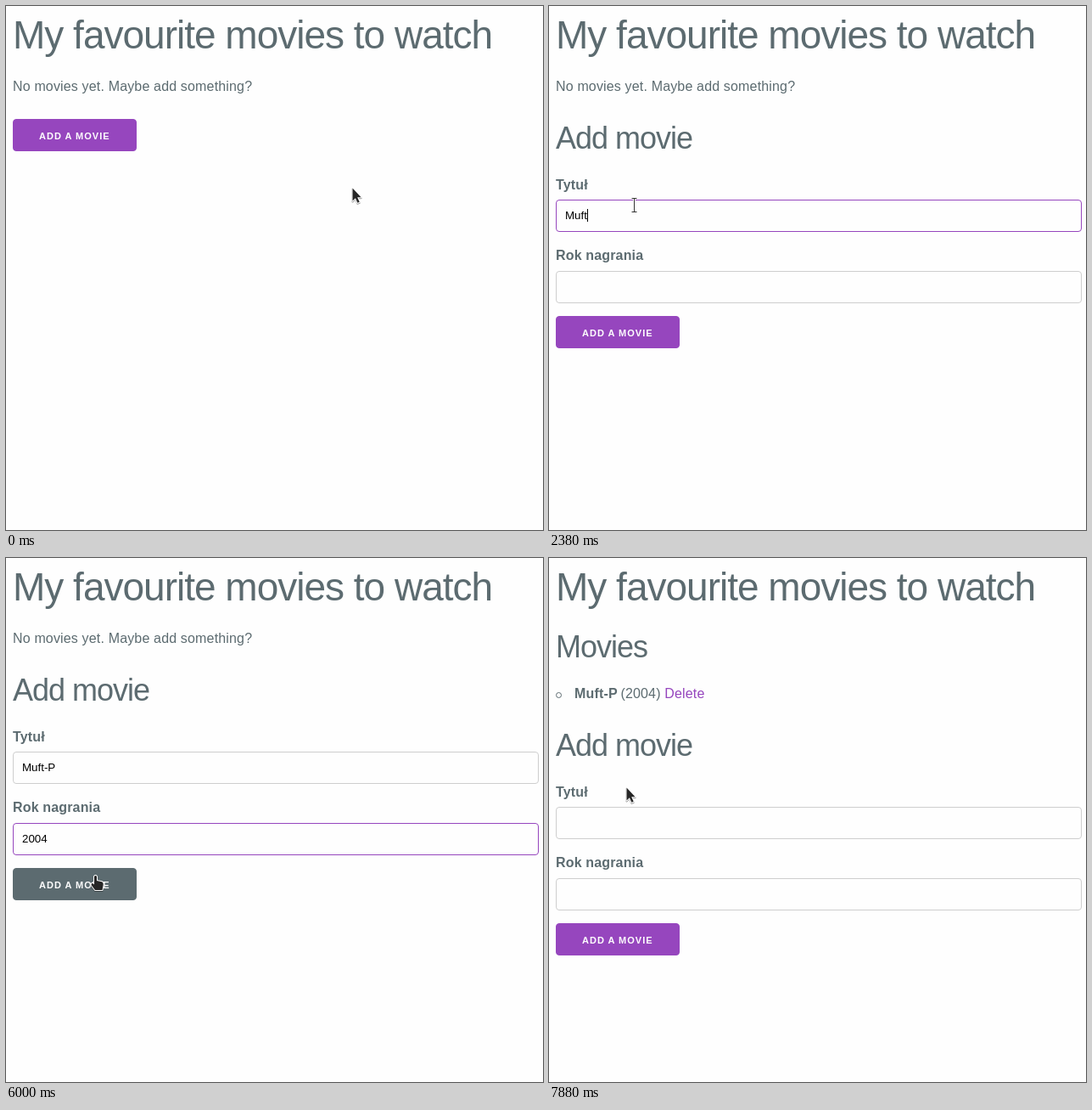
Recreate the animation shown at these times as an HTML page. Size 633 by 617 pixels, loop 8000 ms.

```html
<!DOCTYPE html>
<html lang="en">
<head>
<meta charset="utf-8">
<title>Movie list</title>
<style>
  :root { --ink: #5c6b70; --accent: #9646be; --paper: #fefefe; }
  * { box-sizing: border-box; }
  html, body { margin: 0; width: 100%; height: 100%; overflow: hidden; background: var(--paper); }
  body {
    position: relative;
    color: var(--ink);
    font: 16px/1.6 "Liberation Sans", Arial, sans-serif;
    letter-spacing: .01em;
  }
  main { position: absolute; left: 8px; top: 7px; width: 620px; }
  h1, h2 { margin: 0 0 20px; font-weight: 400; letter-spacing: -1px; white-space: nowrap; }
  h1 { font-size: 46px; line-height: 1.2; }
  h2 { font-size: 36px; line-height: 1.25; }
  p, ul { margin: 0 0 25px; padding: 0; list-style: none; }
  li { position: relative; padding-left: 22px; }
  li::before {
    content: ""; position: absolute; left: 0; top: 11px;
    width: 5px; height: 5px; border: 1px solid var(--ink); border-radius: 50%;
  }
  li b { margin-right: -.9px; }
  li span { color: var(--accent); }
  label { display: block; margin-bottom: 5px; font-weight: 700; }
  .field {
    height: 38px; margin-bottom: 15px; padding: 10px 10px 0;
    border: 1px solid #cecece; border-radius: 4px;
    color: #000; font-size: 13.333px; line-height: 15px; letter-spacing: 0; white-space: nowrap;
  }
  .field.focus { border-color: var(--accent); }
  .field.caret::after {
    content: ""; display: inline-block; vertical-align: top;
    width: 1px; height: 15px; margin-left: -.4px; background: #000;
  }
  .button {
    width: fit-content; height: 38px; padding: 0 30px;
    border: 1px solid var(--accent); border-radius: 4px; background: var(--accent);
    color: #fefefe; font-size: 11px; font-weight: 700; line-height: 38px;
    letter-spacing: 1px; text-transform: uppercase; white-space: nowrap;
  }
  .button.hover { background: var(--ink); border-color: var(--ink); }
  #cursor { position: absolute; left: 0; top: 0; width: 1px; height: 1px; overflow: visible; }
  #arrow, #hand { fill: #262626; stroke: #fff; stroke-width: 2; paint-order: stroke; stroke-linejoin: round; }
  #arrow, #hand { filter: drop-shadow(.5px 1px .7px rgba(0, 0, 0, .4)); }
  #beam { fill: none; }
  [hidden] { display: none !important; }
</style>
</head>
<body>
<main>
  <h1>My favourite movies to watch</h1>
  <p id="empty">No movies yet. Maybe add something?</p>
  <section id="list" hidden>
    <h2>Movies</h2>
    <ul><li><b>Muft-P</b> (2004) <span>Delete</span></li></ul>
  </section>
  <section id="form" hidden>
    <h2>Add movie</h2>
    <label>Tytuł</label>
    <div class="field" id="name"></div>
    <label>Rok nagrania</label>
    <div class="field" id="year"></div>
  </section>
  <div class="button" id="add">Add a movie</div>
</main>

<svg id="cursor" aria-hidden="true">
  <path id="arrow" d="M.5 .5V15.5L3.9 12.2L6.4 17.8L8.7 16.8L6.2 11.2H10.6Z"/>
  <g id="beam">
    <path d="M-2.5 -7.5H3.5M.5 -7.5V8.5M-2.5 8.5H3.5" stroke="#fff" stroke-width="3"/>
    <path d="M-2.5 -7.5H3.5M.5 -7.5V8.5M-2.5 8.5H3.5" stroke="#333"/>
  </g>
  <path id="hand" d="M-1 1Q.5 -1 2 1V6L8 7.2Q10 8 9.7 10.5L8.5 17H0L-4.5 11Q-4.5 8.5 -2.5 9.2L-1 10.5Z"/>
</svg>

<script>
  const LOOP = 8000;
  const $ = id => document.getElementById(id);
  const kinds = ['arrow', 'beam', 'hand'];

  // time, x, y, pointer kind
  const pointer = [
    [0, 408, 214, 'arrow'], [130, 324, 214, 'arrow'], [380, 238, 192, 'arrow'],
    [500, 160, 177, 'arrow'], [630, 118, 169, 'hand'], [750, 111, 168, 'hand'],
    [1000, 111, 168, 'beam'], [1130, 110, 182, 'arrow'], [1250, 106, 206, 'arrow'],
    [1380, 102, 224, 'arrow'], [1500, 100, 234, 'beam'],
    [3130, 99, 270, 'arrow'], [3250, 98, 316, 'beam'], [3380, 96, 329, 'beam'],
    [5630, 110, 366, 'arrow'], [5750, 109, 372, 'hand'], [5880, 107, 376, 'hand'],
    [6000, 105, 374, 'hand'], [6130, 105, 372, 'hand'], [6250, 105, 372, 'arrow'],
    [6750, 105, 368, 'arrow'], [6880, 102, 310, 'arrow'], [7000, 98, 240, 'arrow'],
    [7130, 95, 222, 'hand'], [7630, 95, 224, 'beam'], [7750, 93, 252, 'arrow'],
    [7880, 91, 270, 'arrow']
  ];

  // time, number of typed letters, caret shown
  const typing = {
    name: { text: 'Muft-P', steps: [
      [0, 0, false], [1630, 0, true], [1880, 1, true], [2130, 2, true],
      [2380, 4, true], [2630, 6, true], [3130, 6, false], [6250, 0, false]
    ] },
    year: { text: '2004', steps: [
      [0, 0, false], [3750, 0, true], [4380, 0, false], [4630, 1, true], [4750, 2, true],
      [4880, 3, true], [5130, 4, true], [5630, 4, false], [6250, 0, false]
    ] }
  };

  const within = (t, from, to) => t >= from && t < to;
  const current = (track, t) => track.findLast(step => step[0] <= t);

  function drawField(id, t, focused) {
    const { text, steps } = typing[id];
    const [, count, caret] = current(steps, t);
    const field = $(id);
    field.textContent = text.slice(0, count);
    field.classList.toggle('caret', caret);
    field.classList.toggle('focus', focused);
  }

  function draw(t) {
    const saved = t >= 6250;
    $('empty').hidden = saved;
    $('list').hidden = !saved;
    $('form').hidden = !(within(t, 1000, 6250) || t >= 7630);
    drawField('name', t, within(t, 1630, 3750));
    drawField('year', t, within(t, 3750, 6250));

    const [, x, y, kind] = current(pointer, t);
    $('cursor').style.transform = `translate(${x}px, ${y}px)`;
    for (const k of kinds) $(k).style.display = k === kind ? '' : 'none';
    $('add').classList.toggle('hover', kind === 'hand');
  }

  const start = performance.now();
  function tick() {
    draw((performance.now() - start) % LOOP);
    requestAnimationFrame(tick);
  }
  tick();
</script>
</body>
</html>
```
